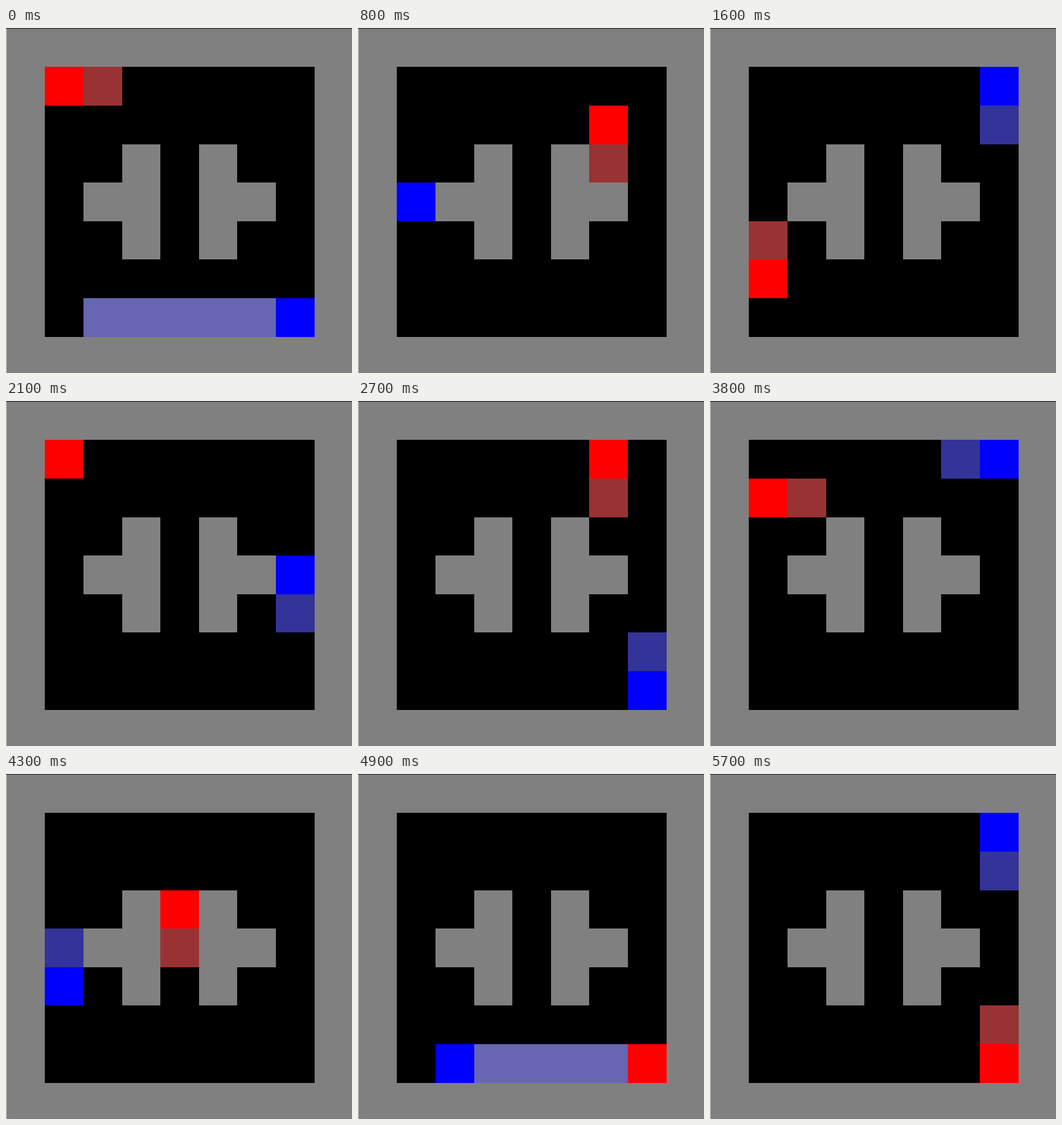
An HTML page with a canvas that plays this animation: 500x498 px, repeating every 5.8 s.

```html
<!DOCTYPE html>
<html>
<head>
<meta charset="utf-8">
<style>
  html, body { margin: 0; width: 100%; height: 100%; overflow: hidden; background: #808080; }
  canvas { display: block; }
</style>
</head>
<body>
<canvas id="stage" width="500" height="498"></canvas>
<script>
const ctx = document.getElementById('stage').getContext('2d');
const STEP = 100, RANGE = 5;
const DIRS = { U: [0, -1], R: [1, 0], D: [0, 1], L: [-1, 0] };
const SPAWNS = { 2: [7, 1, 'D'], 3: [1, 7, 'U'], 4: [7, 7, 'U'] };
const MAP = [
  '#########',
  '#.......#',
  '#.......#',
  '#..#.#..#',
  '#.##.##.#',
  '#..#.#..#',
  '#.......#',
  '#.......#',
  '#########'
];

// Scripts: capital = face and step, small = turn, * = fire, digit = respawn
const agents = [
  {
    color: '#f00', aim: '#993333', beam: '#b26666', start: [1, 1, 'R'],
    script: 'rRRRd*RRD' + 'DULL3ruU' + 'UUUUURRRRRd' + 'DDULLd*LLLr' + 'R*RRDDDDD4d' + '4l*uUDlu'
  },
  {
    color: '#00f', aim: '#333399', beam: '#6666b2', start: [7, 7, 'L'],
    script: '*LLL3UUUl' + 'UUr*RRR2' + 'l*DDDDDDl*u' + 'l*uUUUUUUdl' + 'LD3UUDDr*R*' + 'RRR2LRrd'
  }
];
const COUNT = agents[0].script.length;

const isWall = (x, y) => MAP[y][x] === '#';
const edge = k => k ? Math.round(0.8 + 55.6 * k) : 0;

function cell(x, y, color) {
  ctx.fillStyle = color;
  ctx.fillRect(edge(x), edge(y), edge(x + 1) - edge(x), edge(y + 1) - edge(y));
}

function pose({ start, script }, n) {
  let [x, y, dir] = start;
  for (const c of script.slice(0, n + 1)) {
    if (SPAWNS[c]) {
      [x, y, dir] = SPAWNS[c];
    } else if (c !== '*') {
      dir = c.toUpperCase();
      const [dx, dy] = DIRS[dir];
      if (c === dir && !isWall(x + dx, y + dy)) {
        x += dx;
        y += dy;
      }
    }
  }
  return { x, y, dir, firing: script[n] === '*' };
}

function ray({ x, y, dir }, length, color) {
  const [dx, dy] = DIRS[dir];
  for (let i = 1; i <= length && !isWall(x + dx * i, y + dy * i); i++) {
    cell(x + dx * i, y + dy * i, color);
  }
}

function draw(n) {
  MAP.forEach((row, y) => [...row].forEach((c, x) => cell(x, y, c === '#' ? '#808080' : '#000')));
  const poses = agents.map(a => pose(a, n));
  agents.forEach((a, i) => ray(poses[i], 1, a.aim));
  agents.forEach((a, i) => poses[i].firing && ray(poses[i], RANGE, a.beam));
  agents.forEach((a, i) => cell(poses[i].x, poses[i].y, a.color));
  ctx.fillStyle = '#c0c0c0';
  ctx.fillRect(0, 0, 1, 498);
  ctx.fillStyle = '#222';
  ctx.fillRect(0, 0, 500, 1);
}

const begin = performance.now();
function tick() {
  draw(Math.floor((performance.now() - begin) / STEP) % COUNT);
  requestAnimationFrame(tick);
}
tick();
</script>
</body>
</html>
```
